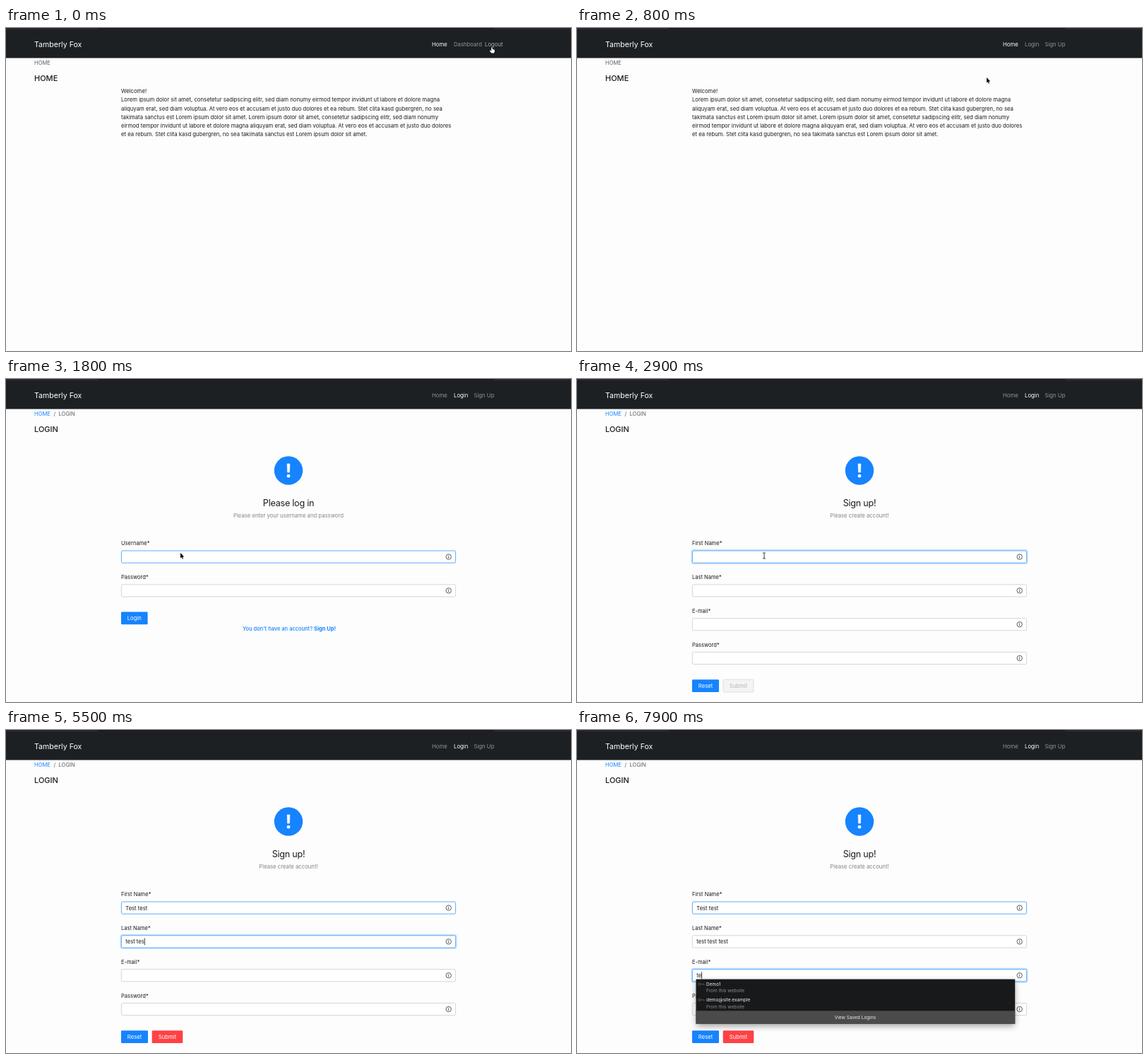
Animation of 800 by 457 pixels, one loop 8 s. Source, as an HTML page with a canvas:

```html
<!DOCTYPE html>
<html lang="en">
<head>
<meta charset="utf-8">
<title>Sign up demo</title>
<style>
html, body { margin: 0; width: 100%; height: 100%; overflow: hidden; background: #fdfdfd; }
canvas { display: block; }
</style>
</head>
<body>
<canvas id="stage" width="800" height="457"></canvas>
<script>
const ctx = document.getElementById('stage').getContext('2d');
const LOOP = 8000, STEP = 100;
const BLUE = '#1683ff', INK = '#1c1c1c', GREY = '#858585';
const LEFT = 163, RIGHT = 637, FIELD_Y = 251.6, FIELD_GAP = 47.8;

const LOGIN_PAGE_AT = 1300, SIGNUP_PAGE_AT = 2400, LOGOUT_AT = 300, TYPING_AT = 3300;

const LOREM = [
  'Welcome!',
  'Lorem ipsum dolor sit amet, consetetur sadipscing elitr, sed diam nonumy eirmod tempor invidunt ut labore et dolore magna',
  'aliquyam erat, sed diam voluptua. At vero eos et accusam et justo duo dolores et ea rebum. Stet clita kasd gubergren, no sea',
  'takimata sanctus est Lorem ipsum dolor sit amet. Lorem ipsum dolor sit amet, consetetur sadipscing elitr, sed diam nonumy',
  'eirmod tempor invidunt ut labore et dolore magna aliquyam erat, sed diam voluptua. At vero eos et accusam et justo duo dolores',
  'et ea rebum. Stet clita kasd gubergren, no sea takimata sanctus est Lorem ipsum dolor sit amet.'
];

const SIGNUP_FIELDS = [
  { label: 'First Name*', value: 'Test test', from: TYPING_AT, pace: 90, focus: [2700, 4700] },
  { label: 'Last Name*', value: 'test test test', from: 4800, pace: 100, focus: [4700, 6400] },
  { label: 'E-mail*', value: 'te', from: 7700, pace: 100, focus: [6400, LOOP] },
  { label: 'Password*', value: '', from: LOOP, pace: 100, focus: [LOOP, LOOP] }
];

// time, x, y of the pointer's hot spot
const POINTER_PATH = [
  [0, 688, 27], [300, 688, 27], [800, 580, 70], [1150, 643, 25], [1300, 643, 25],
  [1800, 247, 246], [1900, 255, 251], [2250, 453, 354], [2400, 453, 354], [2700, 265, 250]
];

const clamp = v => Math.min(1, Math.max(0, v));
const ease = v => v * v * (3 - 2 * v);

// y is the middle of the capital letters
function text(str, x, y, size, color, { weight = 400, align = 'left', spacing = 0 } = {}) {
  ctx.font = `${weight} ${size}px Inter, "Liberation Sans", sans-serif`;
  ctx.letterSpacing = spacing + 'px';
  ctx.textAlign = align;
  ctx.fillStyle = color;
  ctx.fillText(str, x, y + size * 0.36);
  return ctx.measureText(str).width;
}

function rect(x, y, w, h, color) {
  ctx.fillStyle = color;
  ctx.fillRect(x, y, w, h);
}

function box(x, y, w, h, r, fill, stroke, line = 0.7) {
  ctx.beginPath();
  ctx.roundRect(x, y, w, h, r);
  if (fill) { ctx.fillStyle = fill; ctx.fill(); }
  if (stroke) { ctx.strokeStyle = stroke; ctx.lineWidth = line; ctx.stroke(); }
}

function disc(x, y, r, fill) {
  ctx.beginPath();
  ctx.arc(x, y, r, 0, 7);
  ctx.fillStyle = fill;
  ctx.fill();
}

function shape(points, fill, stroke, line) {
  ctx.beginPath();
  points.forEach(([x, y]) => ctx.lineTo(x, y));
  ctx.closePath();
  ctx.lineJoin = 'round';
  ctx.strokeStyle = stroke;
  ctx.lineWidth = line;
  ctx.stroke();
  ctx.fillStyle = fill;
  ctx.fill();
}

function drawHeader(t) {
  rect(0, 0, 800, 42.5, '#1c2023');
  rect(0, 0, 800, 2.5, '#2a272f');
  rect(130, 0, 561, 1.5, '#17151b');
  text('Tamberly Fox', 40, 23.6, 10.6, '#fff');
  const items = t < LOGOUT_AT
    ? [['Home', 603], ['Dashboard', 634], ['Logout', 678]]
    : [['Home', 603], ['Login', 634], ['Sign Up', 662.5]];
  const active = t < LOGIN_PAGE_AT ? 0 : 1;
  items.forEach(([label, x], i) => {
    const hovered = t < LOGOUT_AT && i === 2;
    text(label, x, 23.6, 7.75, i === active ? '#fff' : hovered ? '#aaacad' : '#929496');
  });
}

function drawHome() {
  text('HOME', 40, 49.2, 7.6, '#5b6066');
  text('HOME', 40, 71, 11, INK, { weight: 500 });
  LOREM.forEach((line, i) => text(line, LEFT, 89.4 + i * 12.25, 7.72, INK));
}

function drawIntro(title, subtitle) {
  text('HOME', 40, 49.2, 7.6, BLUE);
  text('/', 67.5, 49.2, 7.6, '#5b6066');
  text('LOGIN', 74.5, 49.2, 7.6, '#5b6066');
  text('LOGIN', 40, 71, 11, INK, { weight: 500 });
  disc(400, 129.5, 20.2, BLUE);
  shape([[398.1, 120], [401.9, 120], [401.5, 132], [398.5, 132]], '#fff', '#fff', 0.6);
  disc(400, 137.2, 2.4, '#fff');
  text(title, 400, 175.2, 12.6, INK, { align: 'center', spacing: -0.25 });
  text(subtitle, 400, 193.6, 7.72, GREY, { align: 'center' });
}

function drawField(row, label, { value = '', glow = 0, hover = false, caret = false } = {}) {
  const y = FIELD_Y + row * FIELD_GAP;
  text(label, LEFT, y - 19.2, 7.55, INK);
  if (glow) {
    ctx.globalAlpha = 0.22 * glow;
    box(LEFT - 0.6, y - 9.7, RIGHT - LEFT + 1.2, 19.4, 2.6, null, BLUE, 2);
    ctx.globalAlpha = 1;
  }
  const lit = glow || hover;
  box(LEFT + 0.4, y - 8.6, RIGHT - LEFT - 0.8, 17.2, 1.8, '#fff', lit ? '#4fa3f7' : '#d2d2d2', 0.9);
  const width = value ? text(value, 169.3, y + 0.2, 7.65, INK) : 0;
  if (caret) rect(169.4 + width, y - 4.9, 0.8, 9.8, '#111');

  ctx.beginPath();
  ctx.arc(626.7, y, 3.7, 0, 7);
  ctx.strokeStyle = '#333';
  ctx.lineWidth = 0.8;
  ctx.stroke();
  rect(626.3, y - 0.7, 0.8, 2.7, '#333');
  rect(626.3, y - 2.2, 0.8, 0.9, '#333');
}

function drawButton(label, x, y, w, fill, { color = '#fff', border = null } = {}) {
  box(x, y, w, 17.8, 1.2, fill, border);
  text(label, x + w / 2, y + 9, 7.7, color, { align: 'center' });
}

function drawLogin(t) {
  drawIntro('Please log in', 'Please enter your username and password');
  drawField(0, 'Username*', { hover: t >= 1800 && t < 2000 });
  drawField(1, 'Password*');
  drawButton('Login', LEFT, 329.5, 37.6, BLUE);
  const w = text("You don't have an account? ", 335, 353.7, 7.5, BLUE, { weight: 500 });
  text('Sign Up!', 335 + w, 353.7, 7.5, BLUE, { weight: 700 });
}

function caretVisible(t, field, typed) {
  if (t < field.focus[0] || t >= field.focus[1]) return false;
  if (field.label === 'E-mail*') return t < 7100 || t >= 7400;
  const finished = field.from + field.pace * (field.value.length - 1);
  if (!typed) return t < 2900 || t > 3100;
  return t < finished + 500;
}

function drawSignup(t) {
  drawIntro('Sign up!', 'Please create account!');
  SIGNUP_FIELDS.forEach((f, i) => {
    const typed = t < f.from ? 0 : Math.min(f.value.length, Math.floor((t - f.from) / f.pace) + 1);
    const glow = clamp((t - f.focus[0] + 50) / 200) * (t < f.focus[1] ? 1 : 0);
    drawField(i, f.label, {
      value: f.value.slice(0, typed),
      glow,
      hover: i === 0 && t >= 2700,
      caret: caretVisible(t, f, typed)
    });
  });
  drawButton('Reset', LEFT, 425.2, 38, BLUE);
  if (t < TYPING_AT) {
    drawButton('Submit', 207, 425.2, 43, '#f4f4f4', { color: '#b5b5b5', border: '#d5d5d5' });
  } else {
    drawButton('Submit', 206.7, 425.2, 43.6, '#ff4144');
  }
  if (t >= 6400) drawSuggestions();
}

function drawSuggestions() {
  ctx.save();
  ctx.shadowColor = 'rgba(0,0,0,.4)';
  ctx.shadowBlur = 9;
  ctx.shadowOffsetY = 3;
  rect(168.5, 352.6, 451.7, 63, '#18191a');
  ctx.restore();
  rect(168.5, 397.3, 451.7, 18.3, '#4b4b4c');
  ['Demo1', 'demo@site.example'].forEach((login, i) => {
    const y = 359.6 + i * 22.3;
    ctx.beginPath();
    ctx.arc(173.4, y, 1.7, 0, 7);
    ctx.moveTo(175.1, y);
    ctx.lineTo(180, y);
    ctx.lineTo(180, y + 1.6);
    ctx.strokeStyle = '#66686a';
    ctx.lineWidth = 0.8;
    ctx.stroke();
    text(login, 183, y, 6.5, '#f0f0f0');
    text('From this website', 183, y + 9.5, 6.5, '#8d8e90');
  });
  text('View Saved Logins', 394, 407, 6.55, '#e8e8e8', { align: 'center' });
}

function pointerAt(t) {
  const next = POINTER_PATH.findIndex(p => p[0] > t);
  if (next < 0) return POINTER_PATH.at(-1).slice(1);
  const [t0, x0, y0] = POINTER_PATH[next - 1], [t1, x1, y1] = POINTER_PATH[next];
  const k = ease((t - t0) / (t1 - t0));
  return [x0 + (x1 - x0) * k, y0 + (y1 - y0) * k];
}

function drawArrow() {
  shape([[0, 0], [0, 7.6], [1.7, 6.1], [2.9, 8.8], [4, 8.3], [2.9, 5.7], [5.2, 5.5]], '#000', '#fff', 1.1);
}

function drawHand() {
  shape([[-0.7, 0.3], [0.6, 0.3], [0.8, 3], [3.8, 3.8], [4, 6], [3, 8.6], [-0.6, 8.6],
    [-3.2, 5.4], [-2.5, 4.6], [-0.8, 5.6]], '#fff', '#111', 0.9);
}

function drawBeam() {
  rect(-0.45, -3.8, 0.9, 7.6, '#222');
  rect(-2, -4.4, 4, 0.8, '#222');
  rect(-2, 3.6, 4, 0.8, '#222');
}

function drawPointer(t) {
  if (t >= TYPING_AT) return;
  const overLink = t <= LOGOUT_AT || (t >= 1100 && t <= LOGIN_PAGE_AT) || (t >= 2200 && t <= SIGNUP_PAGE_AT);
  ctx.save();
  ctx.translate(...pointerAt(t));
  if (overLink) drawHand();
  else if (t >= 2700) drawBeam();
  else drawArrow();
  ctx.restore();
}

function render(now) {
  const t = Math.floor((now % LOOP) / STEP) * STEP;
  rect(0, 0, 800, 457, '#fdfdfd');
  drawHeader(t);
  if (t < LOGIN_PAGE_AT) drawHome();
  else if (t < SIGNUP_PAGE_AT) drawLogin(t);
  else drawSignup(t);
  drawPointer(t);
}

let start;
function tick(now) {
  start ??= now;
  render(now - start);
  requestAnimationFrame(tick);
}
render(0);
requestAnimationFrame(tick);
</script>
</body>
</html>
```
